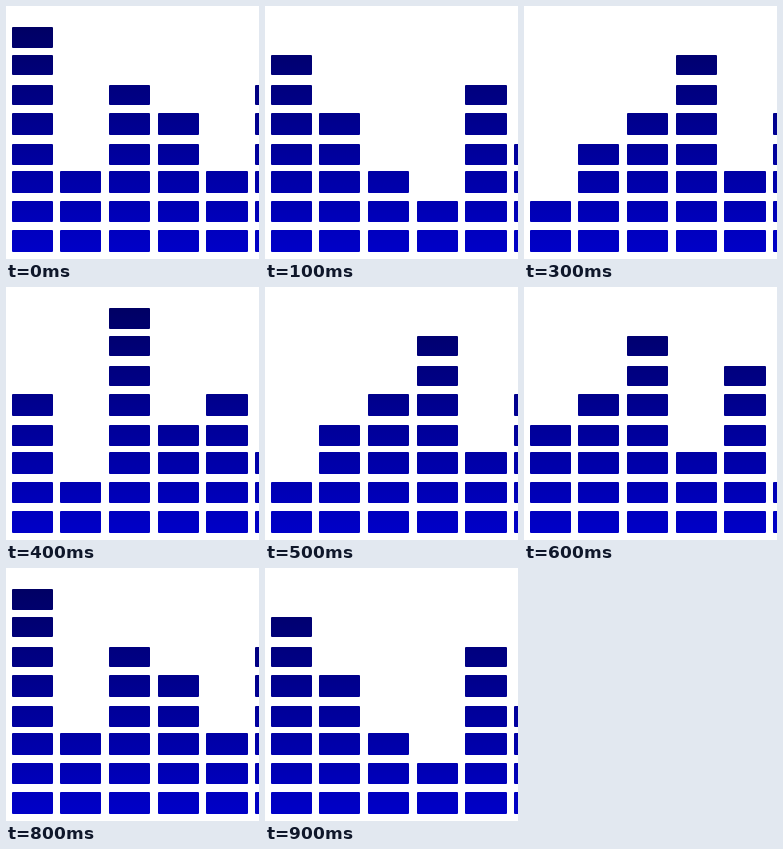
An HTML page with a canvas that plays this animation: 253x253 px, repeating every 1000 ms.

```html
<!DOCTYPE html>
<html>
<head>
<meta charset="utf-8">
<style>
html, body { margin: 0; width: 100%; height: 100%; overflow: hidden; background: #fff; }
canvas { display: block; }
</style>
</head>
<body>
<canvas id="stage" width="253" height="253"></canvas>
<script>
const ctx = document.getElementById('stage').getContext('2d');

// Left and right edges of each column; top and bottom of each row, bottom row first
const columns = [[6, 47], [54, 95], [103, 144], [152, 193], [200, 242], [249, 290]];
const rows = [[224, 246], [195, 216], [165, 187], [138, 159], [107, 129], [79, 99], [49, 69], [21, 42]];

// Number of lit blocks per column
const poses = {
  a: [8, 3, 6, 5, 3, 6],
  b: [7, 5, 3, 2, 6, 4],
  c: [4, 5, 7, 3, 6, 2],
  d: [2, 4, 5, 7, 3, 5],
  e: [5, 2, 8, 4, 5, 3]
};
const order = 'abcdedcbab';
const stepMs = 100;

const blue = ctx.createLinearGradient(0, 21, 0, 246);
blue.addColorStop(0, '#000064');
blue.addColorStop(1, '#0000c8');

function draw(step) {
  ctx.fillStyle = '#fff';
  ctx.fillRect(0, 0, 253, 253);
  ctx.fillStyle = blue;
  ctx.beginPath();
  poses[order[step]].forEach((count, i) => {
    const [left, right] = columns[i];
    for (const [top, bottom] of rows.slice(0, count)) {
      ctx.roundRect(left, top, right - left, bottom - top, 1);
    }
  });
  ctx.fill();
}

const start = performance.now();
function tick() {
  const elapsed = performance.now() - start;
  draw(Math.floor(elapsed / stepMs) % order.length);
  requestAnimationFrame(tick);
}
tick();
</script>
</body>
</html>
```
